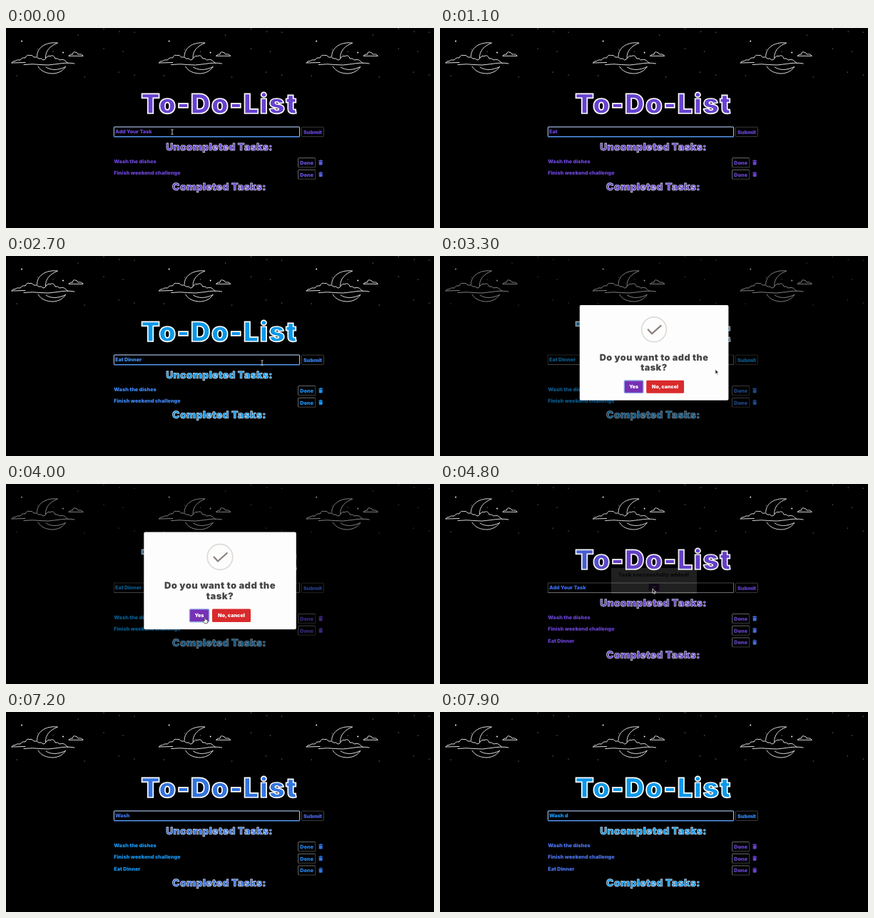
Animation, 600 px wide and 281 px high, one loop 8000 ms. Source, as an HTML page:

```html
<!DOCTYPE html>
<html lang="en">
<head>
<meta charset="utf-8">
<title>To-Do-List</title>
<style>
  :root { --p: #6842d0; --b: #0b98ea; }
  html, body { margin: 0; width: 100%; height: 100%; overflow: hidden; background: #000; }
  svg { display: block; width: 100%; height: 100%; }
  text { font: 900 7.2px Inter, sans-serif; text-rendering: geometricPrecision; white-space: pre; }
  .mid { text-anchor: middle; }
  .head { font-size: 14px; letter-spacing: .3px; fill: url(#sweep); stroke: #e8e8f4; stroke-width: .65; }
  .title { font-size: 38px; letter-spacing: 1.5px; stroke: #fff; stroke-width: 1.7; }
  .ask { font-size: 13px; letter-spacing: .4px; fill: #484848; }
  .white { fill: #fff; }

  .left, .right, .task, .done, .bin, .entry, .submit, .late, .shift, .dim, .modal, .note {
    animation: 8s linear infinite both;
  }
  .left { animation-name: left; }
  .right { animation-name: right; }
  .task { animation-name: task; }
  .done { animation-name: done; }
  .bin { animation-name: bin; }
  .entry { animation-name: entry; }
  .submit { animation-name: submit; }
  .late { animation-name: late; animation-timing-function: step-end; }
  .shift { animation-name: shift; animation-timing-function: step-end; }
  .dim { animation-name: dim; }
  .modal, .note { transform-origin: 300px 136px; }
  .modal { animation-name: modal; }
  .note { animation-name: note; }

  /* colours drift between purple and blue */
  @keyframes left {
    0%, 14% { stop-color: var(--p); }
    30%, 54% { stop-color: var(--b); }
    60% { stop-color: #4468dc; }
    64%, 82% { stop-color: var(--p); }
    96%, 100% { stop-color: var(--b); }
  }
  @keyframes right {
    0%, 15% { stop-color: var(--p); }
    31%, 50% { stop-color: var(--b); }
    58%, 82% { stop-color: var(--p); }
    96%, 100% { stop-color: var(--b); }
  }
  @keyframes task {
    0%, 20% { fill: var(--p); }
    33.75% { fill: #3d85f2; }
    42%, 52.4% { fill: var(--b); }
    52.5%, 66% { fill: var(--p); }
    79%, 88% { fill: var(--b); }
    98.75%, 100% { fill: #4a70e4; }
  }
  @keyframes done {
    0% { fill: #6350da; }
    13.75%, 20% { fill: var(--p); }
    33.75%, 38% { fill: #1c8ff0; }
    50% { fill: #5a48d8; }
    55%, 66% { fill: var(--p); }
    79%, 87% { fill: var(--b); }
    98%, 100% { fill: var(--p); }
  }
  @keyframes bin {
    0% { fill: #5560e0; }
    13.75%, 20% { fill: var(--p); }
    33.75%, 38% { fill: #1c93f0; }
    50%, 55% { fill: var(--p); }
    60% { fill: #4a72e4; }
    70%, 85% { fill: var(--b); }
    98%, 100% { fill: var(--p); }
  }
  @keyframes entry {
    0%, 15% { fill: var(--p); }
    33.75% { fill: #3f8df2; }
    40%, 52% { fill: var(--b); }
    60% { fill: #3c6cf0; }
    68%, 82% { fill: var(--p); }
    97%, 100% { fill: #1494ee; }
  }
  @keyframes submit {
    0%, 15% { fill: var(--p); }
    33.75% { fill: #3a84ee; }
    42% { fill: var(--b); }
    50% { fill: #3f66e0; }
    58%, 82% { fill: var(--p); }
    98.75%, 100% { fill: #2c84e6; }
  }

  @keyframes late { 0% { visibility: hidden; } 52.5%, 100% { visibility: visible; } }
  @keyframes shift { 0% { transform: none; } 52.5%, 100% { transform: translateY(16.6px); } }
  @keyframes dim {
    0%, 38% { opacity: 0; }
    39.5%, 58.4% { opacity: .42; }
    60.2%, 100% { opacity: 0; }
  }
  @keyframes modal {
    0%, 38% { opacity: 0; transform: scale(.7); }
    39.7% { opacity: 1; transform: scale(1.04); }
    41% { transform: scale(.97); }
    42%, 51% { opacity: 1; transform: none; }
    52.5%, 100% { opacity: 0; transform: scale(.5); }
  }
  @keyframes note {
    0%, 52.5% { opacity: 0; transform: scale(.7); }
    54.2% { opacity: 1; transform: scale(1.04); }
    55.4% { transform: scale(.97); }
    56.2%, 58.4% { opacity: 1; transform: none; }
    60.25%, 100% { opacity: 0; transform: scale(.5); }
  }
</style>
</head>
<body>
<svg viewBox="0 0 600 281" preserveAspectRatio="none">
  <defs>
    <linearGradient id="sweep" gradientUnits="userSpaceOnUse" x1="194" x2="244" y1="0" y2="0">
      <stop class="left" offset="0"/>
      <stop class="right" offset="1"/>
    </linearGradient>
    <g id="sky" fill="none" stroke-linecap="round" stroke-linejoin="round">
      <g stroke="#dedede" stroke-width="1">
        <path d="M43.500 40C43 29 54 19 72.500 21C62 25 55 32 55.500 42"/>
        <path d="M8 49Q9 46 13 46.500Q15 44 20 45Q22 41 27 42Q29 37 33 38.500Q37 37 39 41Q44 40 46 43Q50 42 52 45Q55 45 56 42Q59 38 62 39.500Q67 37 69 43Q73 42 75 45Q81 43 84 47L87 49.500"/>
        <path d="M8 49L27 48.500M25 51.500Q38 50 48 51.500T72 50.500T96 50"/>
        <path d="M45 54C49 61 57 64 66 64C74 63.500 80 60 83.500 54.500M56 55C62 59.500 73 60 83.500 54.500"/>
        <path d="M88 39Q91 36 93.500 37Q94 32.500 97 34Q100 34 101 37Q106 36 108 39Z"/>
      </g>
      <path id="stars" stroke="#aaa" stroke-width="1.100"/>
      <path d="M22 18.500h.1M80 34.500h.1" stroke="#fff" stroke-width="1.800"/>
    </g>
    <g id="box" fill="none" stroke-width=".8">
      <path d="M409.600 195.500V183.200Q409.600 182.600 410.200 182.600H433.500" stroke="#858585"/>
      <path d="M433.700 182.900V195.600H409.900" stroke="#505050"/>
    </g>
    <path id="can" d="M438.300 186H439.900L440.300 185.300H442L442.400 186H444V187H438.300ZM438.700 187.600H443.600V191.400Q443.600 192.400 442.600 192.400H439.700Q438.700 192.400 438.700 191.400Z"/>
  </defs>

  <rect width="600" height="281"/>
  <use href="#sky"/>
  <use href="#sky" x="206.600"/>
  <use href="#sky" x="413.200"/>

  <text class="head title mid" x="299.300" y="120">To-Do-List</text>

  <path d="M151.300 152.500V139H411.500" fill="none" stroke="#555" stroke-width=".8"/>
  <path d="M151.300 152.600H411.600V139" fill="none" stroke="#999" stroke-width=".8"/>
  <g id="focus" fill="none">
    <rect x="151.400" y="139" width="260.200" height="13.500" rx="1" stroke="#a4c3f3"/>
    <path d="M151.500 152.900H411.500" stroke="#3f88e8" stroke-width="1.100"/>
  </g>
  <text id="entry" class="entry" x="153" y="148.200">Add Your Task</text>
  <rect x="414.500" y="139.200" width="31" height="13.400" rx="1" fill="none" stroke="#4c4c4c" stroke-width=".8"/>
  <text class="submit mid" x="430" y="148.800">Submit</text>

  <text class="head mid" x="299" y="172.200">Uncompleted Tasks:</text>
  <g id="rows"></g>
  <g class="shift"><text class="head mid" x="299" y="228.200">Completed Tasks:</text></g>

  <rect class="dim" width="600" height="281"/>

  <g class="modal">
    <rect x="193.300" y="67.600" width="213.500" height="136.600" rx="2" fill="#fdfdfd"/>
    <circle cx="300" cy="102.500" r="17.800" fill="none" stroke="#dfdcd8" stroke-width="1.800"/>
    <path d="M291 102L297 108.500L310.500 96.500" fill="none" stroke="#8d827e" stroke-width="2.300"/>
    <text class="ask mid" x="300" y="147">Do you want to add the</text>
    <text class="ask mid" x="300" y="161.500">task?</text>
    <rect x="257.400" y="175.900" width="27.200" height="17.800" rx="1.500" fill="#7631b4" stroke="#8fa5e8" stroke-width="1.400"/>
    <text class="white mid" x="271" y="187.200">Yes</text>
    <rect x="289" y="175.500" width="54" height="18.500" rx="1.500" fill="#d92a2c"/>
    <text class="white mid" x="316" y="187.200">No, cancel</text>
  </g>

  <g class="note">
    <rect x="193.300" y="104" width="213.500" height="64" rx="2" fill="#fdfdfd"/>
    <text class="ask mid" x="300" y="124.500">Task successfully added!</text>
    <rect x="287" y="143" width="26" height="18" rx="1.500" fill="#7631b4"/>
    <text class="white mid" x="300" y="154.600">OK</text>
  </g>

  <g id="pointer">
    <path data-kind="beam" d="M-1.500 -3.500Q0 -3.500 0 -2.500Q0 -3.500 1.500 -3.500M0 -2.500V2.500M-1.500 3.500Q0 3.500 0 2.500Q0 3.500 1.500 3.500" fill="none" stroke="#ddd" stroke-width=".9"/>
    <path data-kind="hand" d="M-.8 -3.500Q0 -4.200 .7 -3.500V-.8L3.400 0Q4 .3 3.800 1.500L3 4.800H-.8L-3 1.600Q-3 .5 -1.900 1L-.8 1.800Z" fill="#fff" stroke="#222" stroke-width=".7"/>
    <path data-kind="arrow" d="M0 0V6.500L1.500 5.200L2.600 7.600L3.600 7.100L2.600 4.800H4.600Z" fill="#111" stroke="#fff" stroke-width=".7"/>
  </g>
</svg>
<script>
  const LOOP = 8000;
  const $ = id => document.getElementById(id);

  const stars = [[44, 30], [66, 33], [101, 10], [137, 1], [137, 29], [164, 33], [158, 62],
                 [159, 5], [180, 6], [180, 66], [15, 67], [110, 69]];
  $('stars').setAttribute('d', stars.map(([x, y]) => `M${x} ${y}h.1`).join(''));

  $('rows').innerHTML = ['Wash the dishes', 'Finish weekend challenge', 'Eat Dinner'].map((name, i) => `
    <g transform="translate(0 ${i * 16.7})" ${i === 2 ? 'class="late"' : ''}>
      <text class="task" x="151.300" y="189.700">${name}</text>
      <use href="#box"/>
      <text class="done mid" x="421.700" y="192">Done</text>
      <use class="bin" href="#can"/>
    </g>`).join('');

  // moments at which each further letter appears
  const typing = [
    { word: 'Eat Dinner', keys: [600, 800, 1000, 1200, 1400, 1550, 1700, 1850, 2000, 2200], end: 4200 },
    { word: 'Wash d', keys: [6300, 6700, 7000, 7200, 7500, 7800], end: LOOP }
  ];

  // pointer stops: time, x, y, shape from then on
  const stops = [
    [0, 233, 146, 'beam'], [500, 233, 146, ''],
    [2300, 300, 150, 'beam'], [2700, 359, 150, 'beam'], [2900, 424, 148, 'hand'],
    [3150, 424, 148, 'arrow'], [3600, 279, 191, 'hand'], [4200, 279, 191, 'arrow'],
    [4500, 298, 147, 'arrow'], [5000, 298, 147, 'beam'], [5500, 250, 147, 'beam'],
    [6200, 250, 147, ''], [LOOP, 250, 147, '']
  ];

  function entryText(t) {
    const run = typing.find(r => t >= r.keys[0] && t < r.end);
    return run ? run.word.slice(0, run.keys.filter(k => k <= t).length) : 'Add Your Task';
  }

  function movePointer(t) {
    const i = stops.findIndex(s => s[0] > t) - 1;
    const [t0, x0, y0, kind] = stops[i];
    const [t1, x1, y1] = stops[i + 1];
    const u = (t - t0) / (t1 - t0);
    const k = u * u * (3 - 2 * u);
    $('pointer').setAttribute('transform', `translate(${x0 + (x1 - x0) * k} ${y0 + (y1 - y0) * k})`);
    for (const shape of $('pointer').children) {
      shape.style.display = shape.dataset.kind === kind ? '' : 'none';
    }
  }

  function draw() {
    const t = performance.now() % LOOP;
    $('entry').textContent = entryText(t);
    $('focus').style.display = t < 3000 || t >= 5600 ? '' : 'none';
    movePointer(t);
    requestAnimationFrame(draw);
  }
  draw();
</script>
</body>
</html>
```
